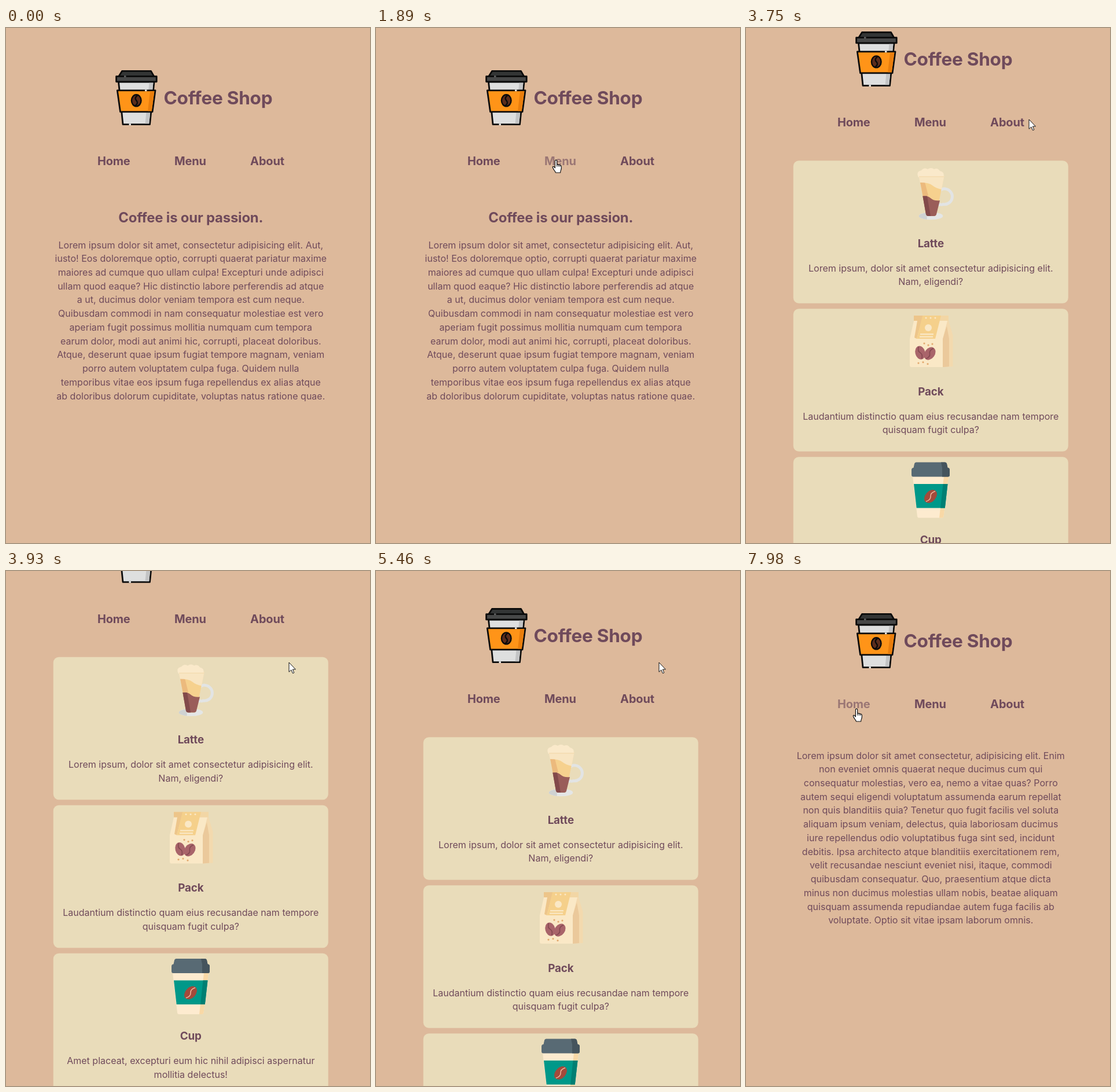
These frames come from a looping animation (629 px wide and 890 px high, 8000 ms). An HTML page:

```html
<!DOCTYPE html>
<html lang="en">
<head>
<meta charset="utf-8">
<title>Coffee Shop</title>
<style>
html, body { margin: 0; width: 100%; height: 100%; overflow: hidden; background: #ddb99b; }
svg { display: block; width: 100%; height: 100%; }
text { font-family: Inter, "Open Sans", sans-serif; fill: #6f4a5b; }
.copy { font-size: 16px; letter-spacing: .02px; text-anchor: middle; }
.bold { font-weight: 700; letter-spacing: -.008em; }
.mid { text-anchor: middle; }
</style>
</head>
<body>
<svg viewBox="0 0 629 890">
  <rect width="629" height="890" fill="#ddb99b"/>
  <g id="page">
    <g id="logo" stroke="#0b0b0b" stroke-width="2.8" stroke-linejoin="round">
      <path d="M194.5 93H256L248.5 166.6H202Z" fill="#dedfdf"/>
      <path d="M247.5 94.4H254.5L247.3 165.2H240.5Z" fill="#c3c4c5" stroke="none"/>
      <path d="M192.3 107.8H258L253 144.8H197.5Z" fill="#ff9418"/>
      <path d="M249 109.2H256.4L251.8 143.4H245Z" fill="#e97e0d" stroke="none"/>
      <path d="M200.5 74.4H250.5L256 84H194.5Z" fill="#333535"/>
      <path d="M190.6 83.6H260.2V92.8H190.6Z" fill="#474848"/>
      <ellipse cx="225.2" cy="125.3" rx="8.3" ry="10" fill="#5c2d1c" stroke-width="2.4"/>
      <path d="M227.5 116Q221 121 225.3 125.3T223 134.6" fill="none" stroke-width="2.4"/>
      <path d="M212.5 166.6h3.4M240 107.8h3.4" stroke="#eeeeec"/>
      <path d="M204 83.6h3.4" stroke="#5d5e5e"/>
    </g>
    <text class="bold" x="272.5" y="132" font-size="31.6">Coffee Shop</text>
    <g id="nav" class="bold" font-size="20"></g>
    <g id="home"></g>
    <g id="menu"></g>
    <g id="about"></g>
  </g>
  <g id="cursor" stroke="#111" stroke-linejoin="round" fill="#fff">
    <path id="arrow" d="M0 0V16.4L3.9 12.9 6.5 18.8 8.9 17.8 6.4 12H11.4Z" stroke-width="1"/>
    <g id="hand" stroke-width="1.2">
      <path d="M-1.6.8a1.6 1.6 0 0 1 3.2 0V7q1.6-.6 2.6.5 1.6-.4 2.6.7 2-.2 2.4 1.7.5 4-.6 6.6-1 1.8-1 4.5H-.6q-.4-2-2.4-4.2-1.7-2.4-2.7-5.1-.1-1.7 1.5-1.3 1.4.6 2.6 2.4Z"/>
      <path d="M1.6 6.6v4M4.2 7.4v3.4M6.8 8.4v2.6" fill="none" stroke-width="1"/>
    </g>
  </g>
</svg>
<script>
const LOOP = 8000, MID = 319.3, LEAD = 23.74;
const $ = id => document.getElementById(id);

const copy = (lines, y) => lines.map((s, i) =>
  `<text class="copy" x="${MID}" y="${y + i * LEAD}">${s}</text>`).join('');
const title = (s, y, size) =>
  `<text class="bold mid" x="${MID}" y="${y}" font-size="${size}">${s}</text>`;
const shape = (fill, d) => `<path fill="${fill}" d="${d}"/>`;
const dots = (fill, r, list) => list.map(([x, y]) =>
  `<circle cx="${x}" cy="${y}" r="${r}" fill="${fill}"/>`).join('');
const bean = (x, y, rx, ry, turn, fill, line) =>
  `<g transform="translate(${x} ${y}) rotate(${turn})"><ellipse rx="${rx}" ry="${ry}" fill="${fill}"/>` +
  `<path d="M0 ${-ry + 1}Q${-rx / 2} ${-ry / 3} 0 0T0 ${ry - 1}" fill="none" stroke="${line}" stroke-width="1.6"/></g>`;

const latte =
  '<ellipse cx="319.5" cy="391.8" rx="20.8" ry="6.4" fill="#e4e6e6"/>' +
  shape('#cfd2d2', 'M298.7 391.8a20.8 6.4 0 0 0 14 6V386a20.8 6.4 0 0 0-14 5.8Z') +
  '<path d="M335 347.5Q341 343.5 345 345a13 13 0 0 1-4 26.5Q336 373 331 371.5" fill="none" stroke="#e2e4e4" stroke-width="5"/>' +
  shape('#f6d18e', 'M299 322H342.5L329 389q-1 3-4 3H315q-3 0-4-3Z') +
  shape('#ecba7d', 'M301 333H309L315 357H305.6Z') +
  shape('#f8e5c2', 'M298.5 322H342.7L338 346Q328 344 322 339T300.6 334Z') +
  shape('#9a5d59', 'M305.4 357.5Q314 356 319 361T335 365L329 389q-1 3-4 3H315q-3 0-4-3Z') +
  shape('#82494a', 'M305.4 357.5H313L319 392H315q-3 0-4-3Z') +
  shape('#fae9ca', 'M298 325q-5-10 5-12 5-6 11-2 6-4 11 0 6-3 10 3 9 2 6 11Z') +
  '<path d="M299 324H342" stroke="#f3dbae" stroke-width="1.5"/>';

const pack =
  shape('#f3d9ae', 'M290 564H350V573L357.5 598V652L340 653Z') +
  shape('#ebc99b', 'M340 604L347 582 351 604V652L340 653Z') +
  shape('#fae8c6', 'M290 573H348L340 604V653H286q-3 0-3-3V604Z') +
  shape('#f2d6a5', 'M290 564H350V573H290Z') +
  shape('#edc58a', 'M290 564H306L295 604 291 602 296 573H290Z') +
  shape('#f5d08b', 'M305 564H337L327 604H295Z') +
  dots('#fae8c6', 1.5, [[311, 568], [319, 568], [327, 568]]) +
  dots('#fae8c6', 6, [[315, 585]]) +
  '<path d="M301 596H324M300 600.5H323" stroke="#fae8c6" stroke-width="2.4"/>' +
  bean(301, 628, 8.5, 11.8, -14, '#a9646a', '#834850') +
  bean(317.5, 629.5, 8.8, 12, 36, '#a9646a', '#834850') +
  dots('#e3aa70', 1.6, [[308, 612], [315, 615], [322, 613], [298, 646], [306, 644.5], [314, 647.5]]);

const cup =
  shape('#fdebcf', 'M288 842H350L341.5 911q-.4 2.5-3 2.5H299q-2.6 0-3-2.5Z') +
  shape('#f8d8a6', 'M342 842H350L341.5 911q-.4 2.5-3 2.5H334Z') +
  shape('#009889', 'M290 855H348.5L343.8 896.5H294.7Z') +
  shape('#007f73', 'M340.5 855H348.5L343.8 896.5H336Z') +
  shape('#586a74', 'M294 817.5H344q2.5 0 3 2.5L348.5 827Q352 827 352 831V839q0 3.5-3 3.5H289q-3 0-3-3.5V831Q286 827 289.5 827L291 820q.5-2.5 3-2.5Z') +
  shape('#45545d', 'M337 817.5H344q2.5 0 3 2.5L348.5 827Q352 827 352 831V839q0 3.5-3 3.5H339V827Z') +
  bean(319, 876.3, 9, 13, 42, '#a34a3b', '#efb39b');

const cards = [
  [latte, 'Latte', ['Lorem ipsum, dolor sit amet consectetur adipisicing elit.', 'Nam, eligendi?']],
  [pack, 'Pack', ['Laudantium distinctio quam eius recusandae nam tempore', 'quisquam fugit culpa?']],
  [cup, 'Cup', ['Amet placeat, excepturi eum hic nihil adipisci aspernatur', 'mollitia delectus!']]
];
$('menu').innerHTML = cards.map(([art, name, lines], i) => {
  const y = 296.2 + i * 256;
  return `<rect x="81.8" y="${y}" width="475" height="246.4" rx="9.5" fill="#e9dcba"/>` +
    art + title(name, y + 149.6, 18.8) + copy(lines, y + 191.4);
}).join('');

$('home').innerHTML = title('Coffee is our passion.', 336, 23.9) + copy([
  'Lorem ipsum dolor sit amet, consectetur adipisicing elit. Aut,',
  'iusto! Eos doloremque optio, corrupti quaerat pariatur maxime',
  'maiores ad cumque quo ullam culpa! Excepturi unde adipisci',
  'ullam quod eaque? Hic distinctio labore perferendis ad atque',
  'a ut, ducimus dolor veniam tempora est cum neque.',
  'Quibusdam commodi in nam consequatur molestiae est vero',
  'aperiam fugit possimus mollitia numquam cum tempora',
  'earum dolor, modi aut animi hic, corrupti, placeat doloribus.',
  'Atque, deserunt quae ipsum fugiat tempore magnam, veniam',
  'porro autem voluptatem culpa fuga. Quidem nulla',
  'temporibus vitae eos ipsum fuga repellendus ex alias atque',
  'ab doloribus dolorum cupiditate, voluptas natus ratione quae.'
], 380.5);

$('about').innerHTML = copy([
  'Lorem ipsum dolor sit amet consectetur, adipisicing elit. Enim',
  'non eveniet omnis quaerat neque ducimus cum qui',
  'consequatur molestias, vero ea, nemo a vitae quas? Porro',
  'autem sequi eligendi voluptatum assumenda earum repellat',
  'non quis blanditiis quia? Tenetur quo fugit facilis vel soluta',
  'aliquam ipsum veniam, delectus, quia laboriosam ducimus',
  'iure repellendus odio voluptatibus fuga sint sed, incidunt',
  'debitis. Ipsa architecto atque blanditiis exercitationem rem,',
  'velit recusandae nesciunt eveniet nisi, itaque, commodi',
  'quibusdam consequatur. Quo, praesentium atque dicta',
  'minus non ducimus molestias ullam nobis, beatae aliquam',
  'quisquam assumenda repudiandae autem fuga facilis ab',
  'voluptate. Optio sit vitae ipsam laborum omnis.'
], 324.5);

const links = [['Home', 157.5, 215], ['Menu', 291, 346], ['About', 422, 481]];
$('nav').innerHTML = links.map(([s, a, b]) =>
  `<text class="mid" x="${(a + b) / 2}" y="237">${s}</text>`).join('');
const items = [...$('nav').children];

const clamp = v => Math.min(1, Math.max(0, v));
const span = (t, a, b) => clamp((t - a) / (b - a));
const smooth = u => u * u * (3 - 2 * u);
const bend = (a, c, b, u) => (1 - u) ** 2 * a + 2 * u * (1 - u) * c + u * u * b;

// start, end, then from, control and to points
const moves = [
  [400, 1080, 632, 456, 400, 300, 165, 250],
  [1080, 1180, 165, 250, 170, 251, 176, 250],
  [1360, 1890, 176, 250, 260, 250, 311, 229],
  [2900, 3190, 311, 229, 398, 165, 473, 131],
  [3350, 3540, 473, 131, 484, 142, 489, 158],
  [5840, 6340, 489, 158, 489, 195, 477, 228],
  [7220, 7980, 477, 228, 345, 376, 191, 239]
];

function pointer(t) {
  const [a, b, x0, y0, cx, cy, x1, y1] = moves.filter(m => t >= m[0]).pop() || moves[0];
  const u = smooth(span(t, a, b));
  return [bend(x0, cx, x1, u), bend(y0, cy, y1, u)];
}

const scrollAt = t => 167 * (smooth(span(t, 3530, 4040)) - smooth(span(t, 5252, 5495)));

function draw(t) {
  const view = t < 2610 ? 'home' : t < 6570 ? 'menu' : 'about';
  for (const id of ['home', 'menu', 'about']) $(id).style.display = id === view ? '' : 'none';

  const top = scrollAt(t);
  $('page').setAttribute('transform', `translate(0 ${-top.toFixed(1)})`);

  // the link loses its hover state briefly after each click
  const [x, y] = pointer(t);
  const stale = (t >= 2610 && t < 2670) || (t >= 6570 && t < 6990);
  const py = y + top;
  const over = stale || py < 214 || py > 246 ? -1 : links.findIndex(([, a, b]) => x >= a && x <= b);
  items.forEach((el, i) => el.setAttribute('opacity', i === over ? .6 : 1));

  $('cursor').style.display = t < 420 ? 'none' : '';
  $('cursor').setAttribute('transform', `translate(${x.toFixed(1)} ${y.toFixed(1)})`);
  $('hand').style.display = over < 0 ? 'none' : '';
  $('arrow').style.display = over < 0 ? '' : 'none';
}

const begin = performance.now();
function tick() {
  draw((performance.now() - begin) % LOOP);
  requestAnimationFrame(tick);
}
tick();
</script>
</body>
</html>
```
